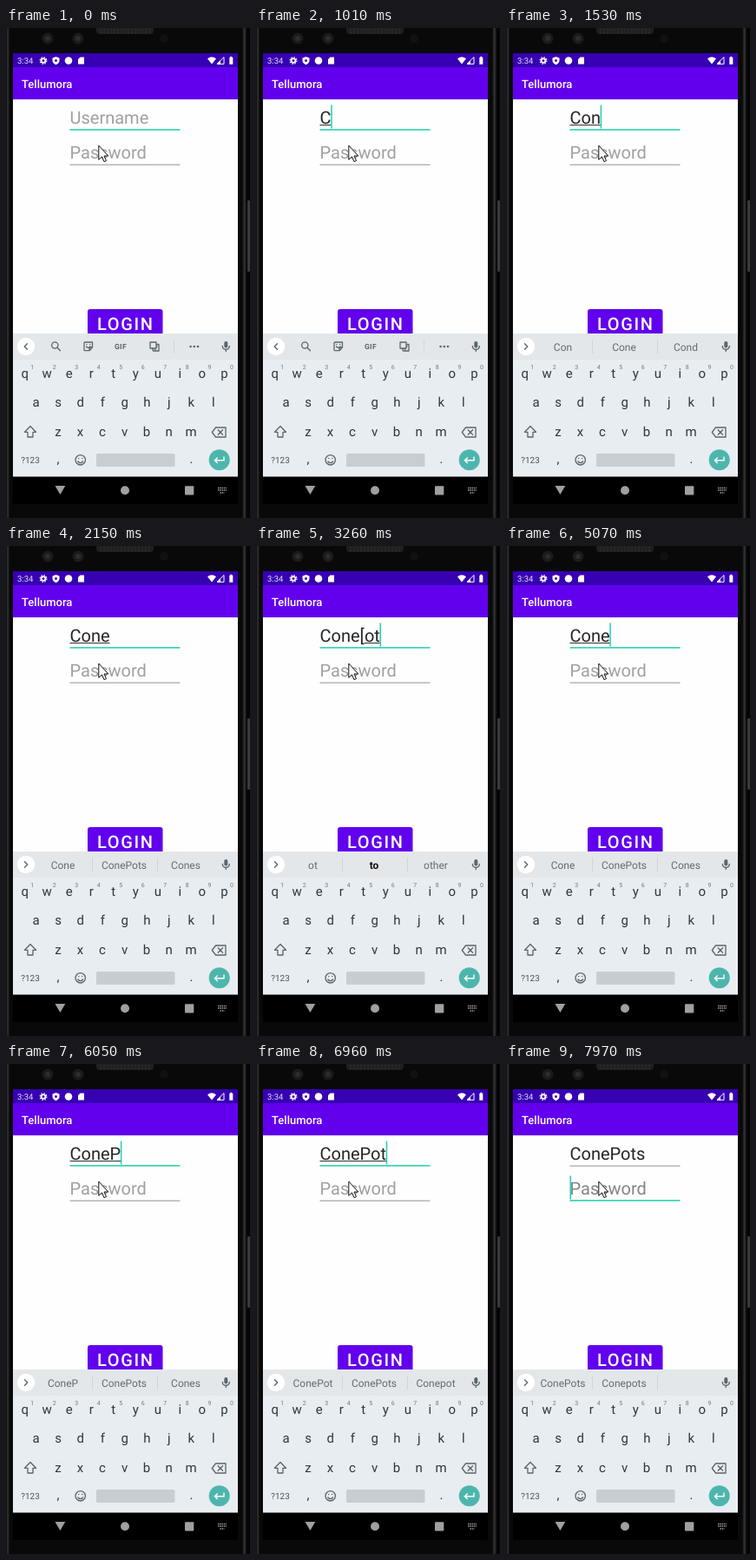
Animation, 281 px wide and 563 px high, one loop 8 s. Source, as an HTML page:

```html
<!DOCTYPE html>
<html lang="en">
<head>
<meta charset="utf-8">
<title>Login typing</title>
<style>
html, body { margin: 0; width: 100%; height: 100%; overflow: hidden; background: #090909; }
svg { display: block; width: 281px; height: 563px; }
text { font-family: Roboto, sans-serif; text-rendering: geometricPrecision; }
.mid { text-anchor: middle; }
.field { font-size: 20px; }
.key { font-size: 15px; fill: #2f383d; }
.num { font-size: 7px; fill: #727b80; }
.word { font-size: 12px; fill: #626b70; }
.line { fill: none; stroke: #5b656a; stroke-width: 1.3; stroke-linejoin: round; stroke-linecap: round; }
</style>
</head>
<body>
<svg viewBox="0 0 281 563" xmlns="http://www.w3.org/2000/svg">
  <defs>
    <linearGradient id="edge">
      <stop offset="0" stop-color="#070707"/><stop offset=".5" stop-color="#343434"/><stop offset="1" stop-color="#0b0b0b"/>
    </linearGradient>
    <clipPath id="page"><rect x="8" y="81" width="259" height="270"/></clipPath>
  </defs>

  <!-- phone body -->
  <rect width="281" height="563" fill="#090909"/>
  <rect x="0" width="4" height="563" fill="url(#edge)"/>
  <rect x="272" width="5" height="563" fill="url(#edge)"/>
  <rect x="277" width="4" height="563" fill="#050505"/>
  <rect x="278" y="198" width="3" height="82" rx="1" fill="#3a3a3a"/>
  <rect x="104" y="-4" width="66" height="11" rx="4" fill="#1f1f1f"/>
  <path d="M108 2H166M108 5H166" stroke="#343434" stroke-dasharray="2 2"/>
  <g fill="#1b1b1d">
    <circle cx="48" cy="12" r="6.5"/><circle cx="83" cy="12" r="6.5"/><circle cx="182" cy="12" r="5" fill="#111"/>
  </g>
  <g fill="#2c2c31"><circle cx="48" cy="12" r="3"/><circle cx="83" cy="12" r="3"/></g>

  <!-- status and title bars -->
  <rect x="8" y="29" width="259" height="17" fill="#3700b3"/>
  <rect x="8" y="45" width="259" height="37" fill="#6200ee"/>
  <text x="13" y="41" font-size="9.5" fill="#e6e0f6">3:34</text>
  <g fill="none" stroke="#fff">
    <circle cx="43" cy="37.5" r="2.4" stroke-width="1.8"/>
    <circle cx="43" cy="37.5" r="3.9" stroke-width="1.2" stroke-dasharray="1.5 1.56"/>
    <circle cx="87" cy="37.5" r="0"/>
  </g>
  <g fill="#fff">
    <path d="M57.5 33L61.5 34.5V37.5Q61.3 40.5 57.5 42.3Q53.7 40.5 53.5 37.5V34.5Z"/>
    <circle cx="57.5" cy="37.5" r="1.4" fill="#3700b3"/>
    <circle cx="72" cy="37.5" r="4.3"/>
    <path d="M85.5 33.5H90V41.5H83V36Z"/>
    <path d="M232 35.3Q237 31 242 35.3L237 41.5Z"/>
    <path d="M251 33.5V41.3H243Z" fill="none" stroke="#fff"/>
    <path d="M247 37.5V41.5H243Z"/>
    <path d="M257.3 33.7H258.3V32.8H260.3V33.7H261.3V41.7H257.3Z"/>
  </g>
  <text x="18" y="69" font-size="13" font-weight="500" fill="#fff">Tellumora</text>

  <!-- page -->
  <rect x="8" y="82" width="259" height="269" fill="#fefefe"/>
  <text id="user" class="field" x="73.5" y="110"></text>
  <rect id="mark" y="111" height="1" fill="#333"/>
  <rect id="userLine" x="73.5" width="127"/>
  <text id="pass" class="field" x="73.5" y="150">Password</text>
  <rect id="passLine" x="73.5" width="127"/>
  <rect id="caret" width="1.5" height="27" fill="#1fd0bb"/>
  <g clip-path="url(#page)">
    <rect x="94" y="323" width="86.5" height="40" rx="3" fill="#6200ee"/>
    <text x="105" y="347" font-size="20" font-weight="500" letter-spacing="1.6" fill="#fff">LOGIN</text>
  </g>
  <path d="M106.8 135V151.3L110.5 147.9L113 153.6L115.5 152.5L113 147H117.8Z" fill="#fff" stroke="#111" stroke-width="1"/>

  <!-- keyboard -->
  <rect x="8" y="351" width="259" height="165" fill="#e8edf1"/>
  <rect x="8" y="351" width="259" height="30" fill="#e3e7ea"/>
  <circle cx="23" cy="366" r="10.2" fill="#fff"/>
  <path id="chevron" class="line" stroke-width="1.5"/>
  <g id="tools">
    <g class="line">
      <circle cx="56.3" cy="364.5" r="3.6"/><path d="M59 367.2L62.5 370.7"/>
      <path d="M91 361H99.5V367L96 370.7H91Q90 370.7 90 369.7V362Q90 361 91 361ZM99.5 367H96V370.7M92.5 366Q94.7 368.7 97 366M92.8 363.7H93M96.6 363.7H96.8"/>
      <path d="M166 361H173V368H166ZM173 363.5H176V371H169.5L168.5 368M171.5 369.5L174 365.5"/>
    </g>
    <text class="mid" x="132" y="369" font-size="8.5" font-weight="700" letter-spacing=".4" fill="#5b656a">GIF</text>
    <path d="M193.5 358V374" stroke="#d3d8db"/>
    <g fill="#5b656a"><circle cx="212.6" cy="366" r="1.3"/><circle cx="216.8" cy="366" r="1.3"/><circle cx="221" cy="366" r="1.3"/></g>
  </g>
  <g id="words">
    <path d="M99.5 358V374M174.5 358V374" stroke="#d0d5d8"/>
    <text class="word mid" x="65.5" y="370.5"></text>
    <text class="word mid" x="136" y="370.5"></text>
    <text class="word mid" x="207" y="370.5"></text>
  </g>
  <rect x="251.3" y="360" width="4" height="7.5" rx="2" fill="#5b656a"/>
  <path class="line" d="M249.3 365.5Q249.5 369.3 253.3 369.3Q257.1 369.3 257.3 365.5M253.3 369.3V371.5"/>
  <g id="keys"></g>
  <g class="line">
    <path d="M28 457.5L34.5 464.3H31V470H25V464.3H21.5Z"/>
    <path d="M241.5 459H253V470H241.5L237.3 464.5ZM244.2 461.8L249.6 467.2M249.6 461.8L244.2 467.2"/>
    <circle cx="85.7" cy="496.3" r="5.7"/><path d="M82.8 498Q85.7 501.3 88.6 498M83.7 494.5H83.8M87.6 494.5H87.7"/>
  </g>
  <text class="mid" x="28" y="500" font-size="10" fill="#4b555a">?123</text>
  <text class="key mid" x="60" y="500">,</text>
  <text class="key mid" x="213.5" y="500">.</text>
  <rect x="104" y="489" width="90.5" height="15" rx="1.5" fill="#c8cdd1"/>
  <circle cx="245.7" cy="496.3" r="12" fill="#4db6ac"/>
  <path d="M251 492.5V496.7H240.5M243.7 493.4L240.4 496.7L243.7 500" fill="none" stroke="#fff" stroke-width="1.4"/>

  <!-- navigation -->
  <rect x="8" y="515.5" width="259" height="31.5" fill="#000"/>
  <g fill="#a0a0a0">
    <path d="M56.5 526H68.3L62.4 536Z"/><circle cx="137" cy="531.3" r="5"/><rect x="206" y="526.3" width="10.3" height="10.3" rx="1"/>
  </g>
  <path d="M244 528.5H254M244 531H254M246.5 534H251.5" stroke="#a0a0a0" stroke-width="1.3" stroke-dasharray="1.5 .8"/>
</svg>
<script>
const $ = id => document.getElementById(id);
const LOOP = 8000, LEFT = 73.5, TEAL = "#1fd0a8", GREY = "#a0a0a0";

function row(letters, x, y, digits = "") {
  return [...letters].map((c, i) => {
    const cx = x + i * 25.52;
    const num = digits ? `<text class="num mid" x="${cx + 8.5}" y="391.5">${digits[i]}</text>` : "";
    return `<text class="key mid" x="${cx}" y="${y}">${c}</text>${num}`;
  }).join("");
}
$("keys").innerHTML = row("qwertyuiop", 21.7, 402, "1234567890") +
  row("asdfghjkl", 34.7, 435) + row("zxcvbnm", 60, 468.5);

// [start time, typed text]
const typed = [
  [0, ""], [1010, "C"], [1260, "Co"], [1530, "Con"], [1650, "Cone"],
  [2580, "Cone["], [2830, "Cone[o"], [3260, "Cone[ot"], [3380, "Cone[ots"],
  [4550, "Cone[ot"], [4670, "Cone[o"], [4930, "Cone["], [5070, "Cone"],
  [5910, "ConeP"], [6710, "ConePo"], [6960, "ConePot"], [7080, "ConePots"]
];
// [start time, suggestions]; a star marks the bold one
const hints = [
  [0, ""], [1380, "Co,Come,Cool"], [1530, "Con,Cone,Cond"], [1650, "Cone,ConePots,Cones"],
  [2580, "The,I,And"], [2980, "o,*of,on"], [3260, "ot,*to,other"], [3380, "ots,*or,outsets"],
  [4550, "ot,*to,other"], [4670, "o,*of,on"], [4930, "The,I,And"], [5070, "Cone,ConePots,Cones"],
  [6050, "ConeP,ConePots,Cones"], [6710, "ConePo,ConePots,Conepo"],
  [6960, "ConePot,ConePots,Conepot"], [7080, "ConePots,Conepots,"]
];
const blinks = [
  [0, 0], [430, 1], [860, 0], [1010, 1], [2150, 0], [2580, 1], [3900, 0], [4430, 1],
  [5630, 0], [5910, 1], [6450, 0], [6710, 1], [7600, 0], [7970, 1]
];
const at = (list, t) => list.findLast(step => step[0] <= t)[1];

const pen = document.createElement("canvas").getContext("2d");
function width(s) {
  pen.font = "20px Roboto, sans-serif";
  return pen.measureText(s).width;
}
function set(el, attrs) {
  for (const k in attrs) el.setAttribute(k, attrs[k]);
}
function rule(id, bottom, active, color) {
  const h = active ? 1.5 : 1;
  set($(id), { y: bottom - h, height: h, fill: color });
}

const slots = [...$("words").querySelectorAll("text")];

function draw(t) {
  const text = at(typed, t), hint = at(hints, t);
  const leaving = t >= 7850, onPass = t >= 7970;

  $("user").textContent = text || "Username";
  set($("user"), { fill: text ? "#262626" : GREY });
  set($("pass"), { fill: onPass ? "#858585" : GREY });

  // underline of the word being composed
  const from = text.indexOf("[") + 1;
  const start = width(text.slice(0, from));
  set($("mark"), { x: LEFT + start, width: leaving ? 0 : width(text) - start });

  rule("userLine", 117.6, !leaving, leaving ? "#929292" : TEAL);
  rule("passLine", 157.6, onPass, onPass ? TEAL : leaving ? "#65b8a8" : "#929292");
  set($("caret"), {
    x: onPass ? LEFT : LEFT + width(text) - (text ? .3 : 0),
    y: onPass ? 128.5 : 88.5,
    opacity: at(blinks, t)
  });

  set($("tools"), { visibility: hint ? "hidden" : "visible" });
  set($("words"), { visibility: hint ? "visible" : "hidden" });
  set($("chevron"), { d: hint ? "M21.5 362.7L24.8 366L21.5 369.3" : "M24.5 362.7L21.2 366L24.5 369.3" });
  const list = hint.split(",");
  slots.forEach((el, i) => {
    const word = list[i] || "", bold = word[0] === "*";
    el.textContent = word.replace("*", "");
    el.style.fontWeight = bold ? 700 : 400;
    el.style.fill = bold ? "#111" : "";
  });
}

const began = performance.now();
function tick() {
  draw((performance.now() - began) % LOOP);
  requestAnimationFrame(tick);
}
tick();
</script>
</body>
</html>
```
